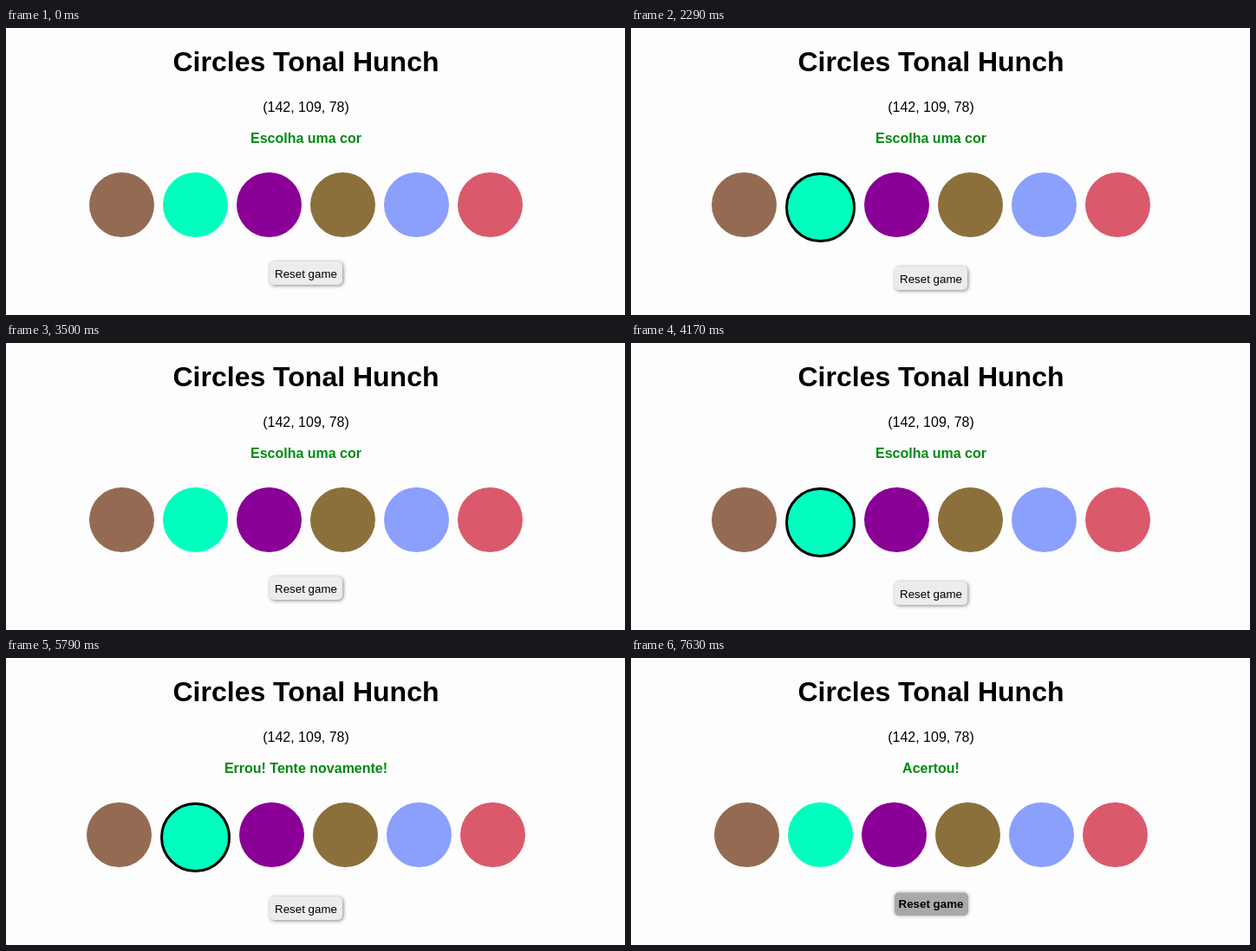
Recreate the animation shown at these times as an HTML page. Size 714 by 332 pixels, loop 8 s.

```html
<!DOCTYPE html>
<html lang="pt">
<head>
<meta charset="utf-8">
<style>
  html, body { margin: 0; width: 100%; height: 100%; overflow: hidden; background: #fdfdfd; }
  svg { display: block; width: 714px; height: 332px; }
  text { font-family: "Liberation Sans", Arial, sans-serif; font-size: 16px; text-anchor: middle; }
  .bold { font-weight: bold; }
  #title { font-size: 32px; }
  #message { fill: #008a12; }
  #button text { font-size: 13.333px; }
  #face { fill: #ececec; filter: drop-shadow(1px 1.5px 2px rgba(80, 80, 80, .7)); }
  .over #face { fill: #a9a9a9; filter: drop-shadow(0 0 2px rgba(128, 128, 128, .7)); }
  .over text { font-weight: bold; }
</style>
</head>
<body>
<svg viewBox="0 0 714 332">
  <text id="title" class="bold" x="346" y="50">Circles Tonal Hunch</text>
  <text x="346" y="97">(142, 109, 78)</text>
  <text id="message" class="bold" x="346" y="133"></text>
  <g id="balls"></g>
  <g id="button">
    <rect id="face" x="304" y="270" width="84" height="27" rx="5"/>
    <text x="346" y="289">Reset game</text>
  </g>
</svg>
<script>
const LOOP = 8000;
const NONE = -1, BUTTON = 9;
const colors = ['#946b52', '#00ffbe', '#8a0096', '#8c703c', '#8aa0fc', '#da5a6c'];

// [start time, what the pointer is over]
const hovers = [
  [0, NONE], [1830, 0], [2250, NONE], [2290, 1], [2880, NONE],
  [3080, 2], [3130, 3], [3210, NONE], [3830, BUTTON], [3960, NONE],
  [4130, 2], [4170, 1], [5000, NONE], [5790, 1], [6670, NONE],
  [6710, 0], [7580, NONE], [7630, BUTTON]
];
const messages = [
  [0, 'Escolha uma cor'], [4750, 'Errou! Tente novamente!'], [7000, 'Acertou!']
];

const byId = id => document.getElementById(id);
const message = byId('message');
const button = byId('button');
const face = byId('face');

function set(el, attrs) {
  for (const key in attrs) el.setAttribute(key, attrs[key]);
}

function at(track, t) {
  let value = track[0][1];
  for (const [start, next] of track) if (t >= start) value = next;
  return value;
}

const balls = colors.map(fill => {
  const ball = document.createElementNS('http://www.w3.org/2000/svg', 'circle');
  set(ball, { fill, stroke: '#000' });
  return byId('balls').appendChild(ball);
});

function render(t) {
  const hover = at(hovers, t);
  const onBall = hover >= 0 && hover < balls.length;
  const onButton = hover === BUTTON;

  // A 3px border widens the row by 6px and pushes its neighbours apart.
  balls.forEach((ball, i) => {
    const active = i === hover;
    const shift = onBall ? 3 * Math.sign(i - hover) : 0;
    set(ball, {
      cx: 133.5 + 85 * i + shift,
      cy: active ? 207.5 : 204.5,
      r: active ? 39 : 37.5,
      'stroke-width': active ? 3 : 0
    });
  });

  const label = at(messages, t);
  if (message.textContent !== label) message.textContent = label;

  set(button, {
    class: onButton ? 'over' : '',
    transform: `translate(0 ${onBall ? 6 : 0})`
  });
  set(face, { y: onButton ? 271.5 : 270, width: onButton ? 85 : 84, height: onButton ? 26.5 : 27 });
}

const begin = performance.now();
function frame() {
  render((performance.now() - begin) % LOOP);
  requestAnimationFrame(frame);
}
render(0);
requestAnimationFrame(frame);
</script>
</body>
</html>
```
